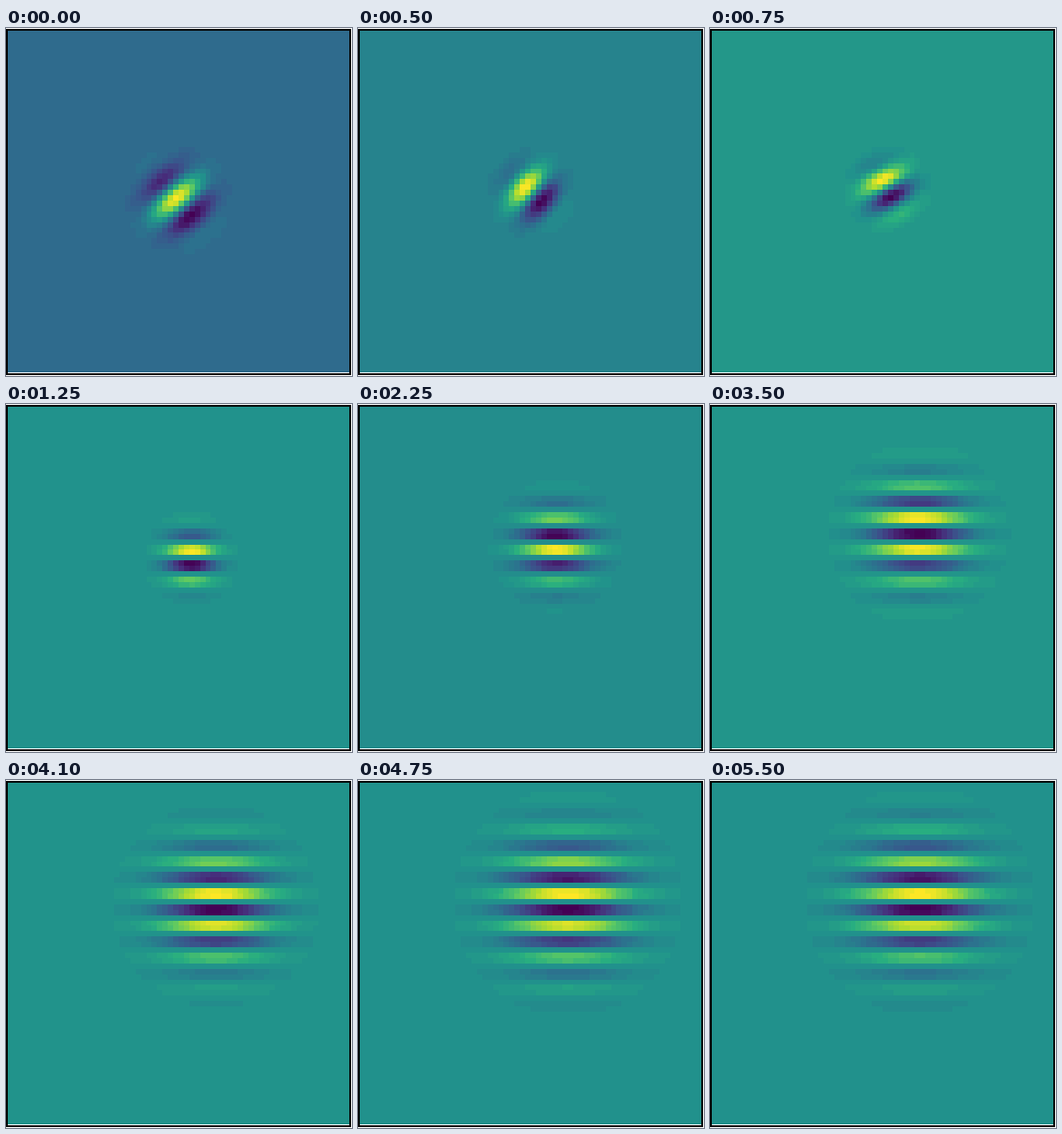
Animation of 381x383 px, one loop 10 s. Source, as an HTML page with a canvas:

```html
<!DOCTYPE html>
<html lang="en">
<head>
<meta charset="utf-8">
<title>Gabor patch fit</title>
<style>
html, body { margin: 0; width: 100%; height: 100%; overflow: hidden; background: #fff; }
canvas { display: block; }
</style>
</head>
<body>
<canvas id="plot" width="381" height="383"></canvas>
<script>
const ctx = document.getElementById('plot').getContext('2d');
const LOOP = 10000, TICK = 50, END = 5500;
const N = 64, SIDE = 378, LEVELS = 40;

const RAMP = '440154 472d7b 3b528b 2c728e 21918c 28ae80 5ec962 addc30 fde725'
  .split(' ')
  .map(h => [0, 2, 4].map(i => parseInt(h.slice(i, i + 2), 16)));

const lerp = (a, b, k) => a + (b - a) * k;
const clamp = v => Math.min(1, Math.max(0, v));
const edge = i => Math.ceil(0.5 + i * SIDE / N);

function color(t) {
  const p = clamp(t) * (RAMP.length - 1);
  const i = Math.min(RAMP.length - 2, Math.floor(p));
  return `rgb(${RAMP[i].map((v, c) => Math.round(lerp(v, RAMP[i + 1][c], p - i)))})`;
}

// Patch at a time in seconds; lengths are in cells
function patchAt(t) {
  const ramp = (a, b) => clamp((t - a) / (b - a));
  const glide = (a, b) => Math.sin(ramp(a, b) * Math.PI / 2);
  const first = ramp(0, 0.5), turn = ramp(0.5, 1.1);
  const cy = lerp(31.9, 22.3, glide(0, 5.6));
  return {
    cx: lerp(31.9, 38.95, glide(0.4, 4.2)),
    cy,
    sigma: 3.6 - 0.6 * first + 4.8 * ramp(1.1, 4.7),
    wave: lerp(10, 6, turn),
    tilt: (40 + 8 * first - 48 * turn) * Math.PI / 180,
    // once level, the stripes stay put while the envelope moves on
    crest: lerp(-0.55 - 1.4 * first, 27 - cy, turn)
  };
}

function gabor({ cx, cy, sigma, wave, tilt, crest }) {
  const sin = Math.sin(tilt), cos = Math.cos(tilt);
  return Array.from({ length: N * N }, (_, n) => {
    const x = n % N + 0.5 - cx, y = Math.floor(n / N) + 0.5 - cy;
    const u = x * sin + y * cos - crest;
    return Math.exp(-(x * x + y * y) / (2 * sigma * sigma)) * Math.cos(2 * Math.PI * u / wave);
  });
}

function rect(fill, x, y, w, h) {
  ctx.fillStyle = fill;
  ctx.fillRect(x, y, w, h);
}

function draw(time) {
  const cells = gabor(patchAt(time / 1000));
  const lo = Math.min(...cells), span = Math.max(...cells) - lo;
  const base = -lo / span;

  rect('#fff', 0, 0, 381, 383);
  rect(color(base), 1, 1, SIDE, SIDE);
  cells.forEach((v, n) => {
    const level = Math.round(v / span * LEVELS);
    if (!level) return;
    const i = n % N, j = Math.floor(n / N), x = edge(i), y = edge(j);
    rect(color(base + level / LEVELS), x, y, edge(i + 1) - x, edge(j + 1) - y);
  });

  for (const y of [1, 380]) rect('#000', 0, y, 380, 2);
  for (const x of [0, 378]) rect('#000', x, 1, 2, 381);
}

const start = performance.now();
let shown = -1;
function loop() {
  const t = (performance.now() - start) % LOOP;
  const tick = Math.min(END, Math.floor(t / TICK) * TICK);
  if (tick !== shown) draw(shown = tick);
  requestAnimationFrame(loop);
}
loop();
</script>
</body>
</html>
```
